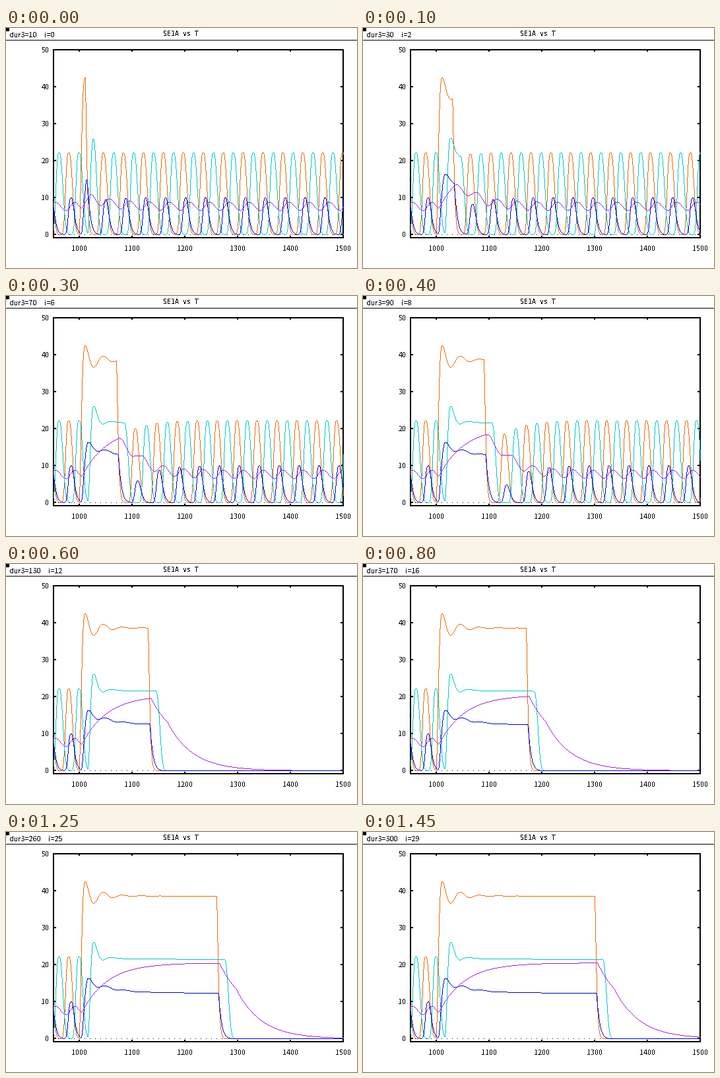
A matplotlib script that plays this animation: 532x364 px, repeating every 1500 ms.

```python
import numpy as np
import matplotlib
import matplotlib.pyplot as plt
from matplotlib.animation import FuncAnimation
from matplotlib.collections import LineCollection
from matplotlib.patches import Rectangle

W, H, DPI = 532, 364, 100
PX = 72 / DPI
FRAMES, INTERVAL = 30, 50
LEFT, RIGHT, TOP, BOTTOM = 72, 511, 33, 318
PERIOD = 37.75
LAST_ALIVE = 110      # longer stimuli silence the rhythm
COLS = np.arange(LEFT, RIGHT + 2)
T = 1000 + (COLS + 0.5 - 111) / 0.8
S = T - 1000          # time since the stimulus began

matplotlib.rcParams["text.antialiased"] = False


def decay(t, width, power):
    return np.exp(-(np.maximum(t, 0) / width) ** power)


def ring(peak, size, tau):
    return size * np.exp(-(S - peak) / tau) * np.cos((S - peak) * np.pi / 18)


def plateau(level, start, rise):
    return np.where(S > start, level * (1 - decay(S - start, rise, 2)), 0)


def train(peaks, heights, rise, fall):
    """Highest of many bursts; rise and fall are (width, power) pairs."""
    dt = T - peaks[:, None]
    bursts = decay(-dt, *rise) * decay(dt, *fall)
    return (heights[:, None] * bursts).max(axis=0)


def swing(x, y):
    """Cosine easing from each extreme to the next."""
    i = np.clip(np.searchsorted(x, T) - 1, 0, len(x) - 2)
    u = np.clip((T - x[i]) / (x[i + 1] - x[i]), 0, 1)
    return y[i] + (y[i + 1] - y[i]) * (1 - np.cos(np.pi * u)) / 2


def charge(t):
    return 20.5 - 13.4 * np.exp(-(t - 1006) / 48)


def waves(peaks, low, high):
    """Slow wave with a trough before and a crest after each burst."""
    x = np.stack([peaks - 5, peaks + 11], axis=1).ravel()
    y = np.stack([6.5 + low, 8.8 + high], axis=1).ravel()
    return x, y


def purple_curve(d, top, rebound, k):
    p0 = charge(top)
    x, y = waves(np.array([981 - PERIOD, 981]), np.zeros(2), np.zeros(2))
    before = swing(np.append(x, 1006), np.append(y, 7.1))
    if len(rebound):
        load = 1 - decay(d, 30, 1.3)
        x, y = waves(rebound, 6.4 * load * .32 ** k, 4.1 * load * .3 ** k)
        after = swing(np.append(top, x), np.append(p0, y))
    else:
        bend = 1038 + d
        fall = 6.1 + (p0 - 6.1) * np.exp(-(np.minimum(T, bend) - top) / 47)
        after = fall * decay(T - bend, 47, 1)
    return np.where(T < 1006, before, np.where(T < top, charge(T), after))


def curves(d):
    lag = 10 / d
    off = S - d - lag

    # Bursts after the stimulus recover in height and spacing
    k = np.arange(14 if d <= LAST_ALIVE else 0)
    steps = PERIOD + .047 * (d - 5) * .2 ** k
    rebound = 1035.4 + d + (d - 37) ** 2 / 600 + np.cumsum(steps) - steps
    weak = 3.7 * (d / 90) ** 2 * .35 ** k

    peaks = np.append([981 - PERIOD, 981], rebound)
    steps = np.append([PERIOD, PERIOD], steps)
    weak = np.append([0, 0], weak)
    blue_weak = np.append([0, 0], .058 * d * .3 ** k)

    rise, fall = (7.5, 3), (9, 2.35)
    orange = np.maximum(
        train(peaks, 22.2 - weak, rise, fall),
        plateau(38.65 + ring(11.5, 4.3, 24), 0, 5.4) * decay(off - 1, 4, 1.4))
    cyan = np.maximum(
        train(peaks + .515 * steps, 22.2 - .6 * weak, rise, fall),
        plateau(21.5 + .8 * np.exp(-(S - 30) / 40) + ring(30, 3.6, 10.5),
                16.5, 5.4) * decay(off - 15, 10, 2.7))
    blue = np.maximum(
        train(peaks + 5, 10 - blue_weak, (7.1, 3.1), (7.6, 1.6)),
        plateau(12.35 + 4.8 * np.exp(-S / 45) + ring(17, 1.2, 30),
                4, 7.2) * decay(off - 4, 6, 1.2))
    purple = purple_curve(d, 1006 + d + 6 * lag, rebound, k)
    return orange, cyan, purple, blue


def columns(values):
    """One crisp upright bar per pixel column, joining it to the next."""
    row = np.floor(313.5 - 5.6 * values)
    top = np.minimum(row[:-1], row[1:])
    bottom = np.maximum(top + 1, np.maximum(row[:-1], row[1:]))
    x = COLS[:-1] + 0.5
    return np.stack([np.stack([x, top], 1), np.stack([x, bottom], 1)], 1)


fig = plt.figure(figsize=(W / DPI, H / DPI), dpi=DPI, facecolor="white")
ax = fig.add_axes([0, 0, 1, 1])
ax.set_xlim(0, W)
ax.set_ylim(H, 0)
ax.axis("off")


def label(x, y, text, ha="left", family="Noto Sans CJK JP", size=10.8):
    return ax.text(x, y, text, ha=ha, va="baseline", color="black",
                   family=family, fontsize=size * PX)


def bar(x, y, w, h):
    ax.add_patch(Rectangle((x, y), w, h, color="black", lw=0, snap=False))


# Header strip
bar(0, 0, 5, 5)
bar(0, 18, W, 1)
status = label(5, 14, "")
label(238, 12, "SE1A vs T", family="DejaVu Sans Mono", size=10)

# Frame, ticks and dotted zero line
ax.add_patch(Rectangle((LEFT, TOP), RIGHT - LEFT, BOTTOM - TOP, fill=False,
                       ec="black", lw=2 * PX, antialiased=False, zorder=2))
for n in range(6):
    x, y = 111 + 80 * n, 313 - 56 * n
    bar(LEFT, y - 1, 4, 2)
    bar(RIGHT - 4, y - 1, 4, 2)
    bar(x - 1, TOP, 2, 3)
    bar(x - 1, BOTTOM - 3, 2, 3)
    label(65.5, y + 4, str(10 * n), "right")
    label(x, 338, str(1000 + 100 * n), "center")
for x in range(LEFT + 7, RIGHT, 8):
    bar(x, 313, 1, 1)

lines = [LineCollection([], colors=color, linewidths=PX, snap=False, zorder=3)
         for color in ("#ec6a00", "#00c8c8", "#a020f0", "#0000e0")]
for line in lines:
    line.set_capstyle("butt")
    ax.add_collection(line, autolim=False)


def draw(i):
    d = 10 + 10 * i
    status.set_text(f"dur3={d}     i={i}")
    for line, values in zip(lines, curves(d)):
        line.set_segments(columns(values))
    return [status, *lines]


anim = FuncAnimation(fig, draw, frames=FRAMES, interval=INTERVAL,
                     repeat=True, repeat_delay=0, blit=False)
plt.show()
```
